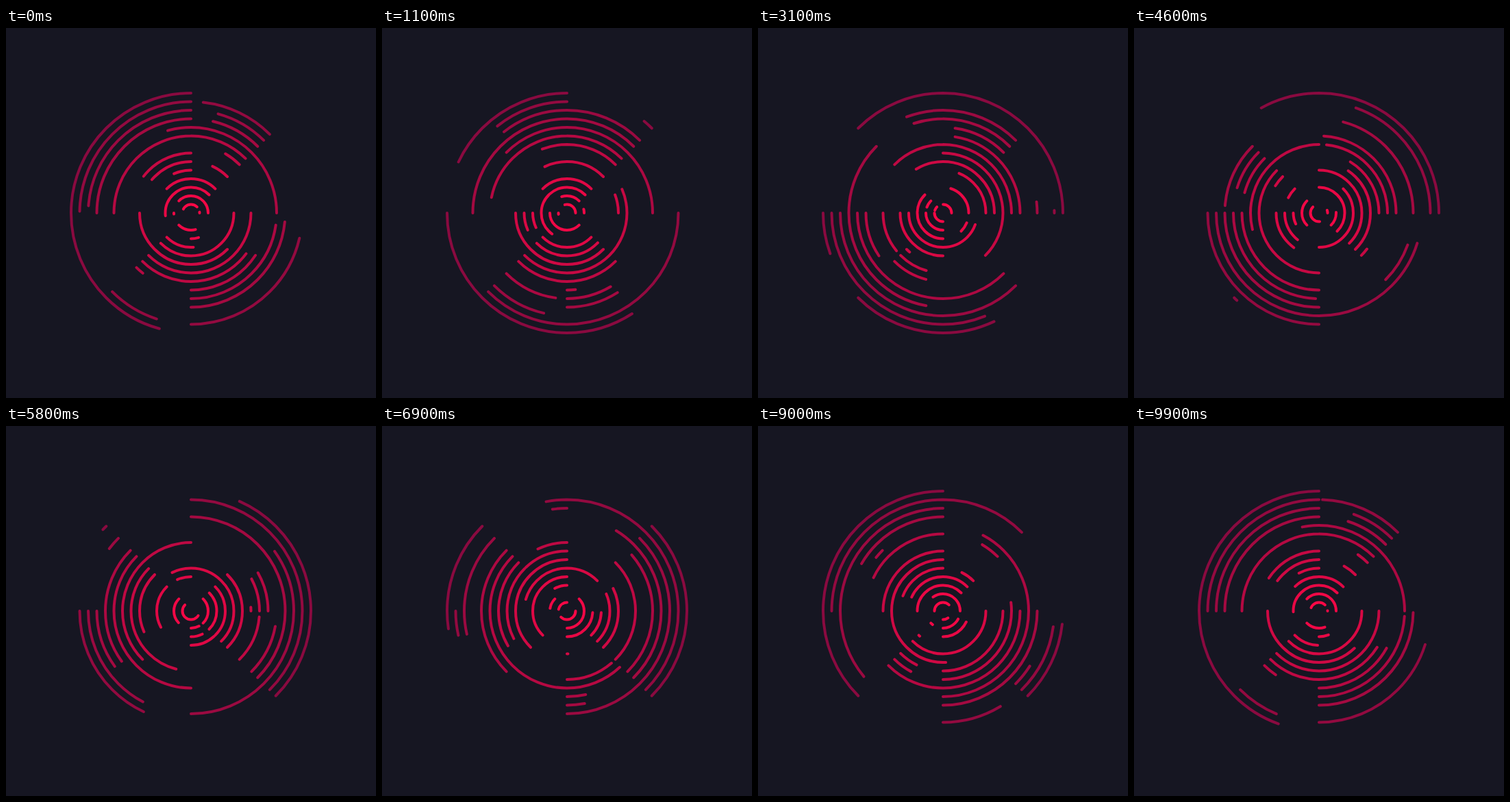
Write an HTML page that moves like this. It is 540x540 px and loops after 10 s.

```html
<!DOCTYPE html>
<html lang="en">
<head>
<meta charset="utf-8">
<title>Rings</title>
<style>
  html, body { margin: 0; width: 100%; height: 100%; overflow: hidden; background: #161622; }
  svg { display: block; width: 100vw; height: 100vh; }
  path { fill: none; stroke-width: 4; stroke-linecap: round; }
</style>
</head>
<body>
<svg viewBox="0 0 540 540"></svg>
<script>
const CENTER = 270, GAP = 12.5, RINGS = 14, SECTOR = 45;
const TICK_MS = 100, LOOP = 100, RAMP = 10;

// Every ring plays the same pattern, turned and delayed a step further than the ring inside it.
const TURN = -3 * SECTOR, LAG = 26.8;

// Ticks at which each sector of the innermost ring is half open, then half closed.
const pattern = [
  [[60.3, 83.2]],
  [[50, 93]],
  [[23.7, 82]],
  [[14.1, 62]],
  [[30, 71.6], [76.3, 99]],
  [[66.5, 109.3]],
  [[77.4, 119.6], [113.8, 135.8]],
  [[103.6, 145.2]]
];

const clamp = v => Math.max(0, Math.min(1, v));
const wrap = v => ((v % LOOP) + LOOP) % LOOP;
const mix = (a, b, f) => Math.round(a + (b - a) * f);

function point(radius, degrees) {
  const a = degrees * Math.PI / 180;
  return (CENTER + radius * Math.cos(a)).toFixed(2) + ' ' +
         (CENTER + radius * Math.sin(a)).toFixed(2);
}

// Share of a sector that is open at a tick.
function openness(tick, [on, off]) {
  const distance = Math.abs(wrap(tick - (on + off) / 2 + LOOP / 2) - LOOP / 2);
  return clamp(0.5 + ((off - on) / 2 - distance) / RAMP);
}

// Sectors open counter-clockwise from their clockwise end.
function arc(radius, head, level) {
  const tail = head - level * SECTOR;
  return `M${point(radius, tail)}A${radius} ${radius} 0 0 1 ${point(radius, head)}`;
}

const svg = document.querySelector('svg');
const rings = Array.from({ length: RINGS }, (_, i) => {
  const path = document.createElementNS('http://www.w3.org/2000/svg', 'path');
  const f = i / (RINGS - 1);
  path.setAttribute('stroke', `rgb(${mix(250, 138, f)},${mix(8, 10, f)},${mix(70, 64, f)})`);
  svg.append(path);
  return path;
});

function draw(ms) {
  const tick = Math.floor(ms / TICK_MS) % LOOP;
  rings.forEach((path, i) => {
    let d = '';
    pattern.forEach((spans, sector) => {
      const level = Math.max(...spans.map(span => openness(tick - i * LAG, span)));
      if (level > 0.01) d += arc(GAP * (i + 1), (sector + 1) * SECTOR + i * TURN, level);
    });
    path.setAttribute('d', d);
  });
}

const start = performance.now();
function loop() {
  draw(performance.now() - start);
  requestAnimationFrame(loop);
}
draw(0);
requestAnimationFrame(loop);
</script>
</body>
</html>
```
